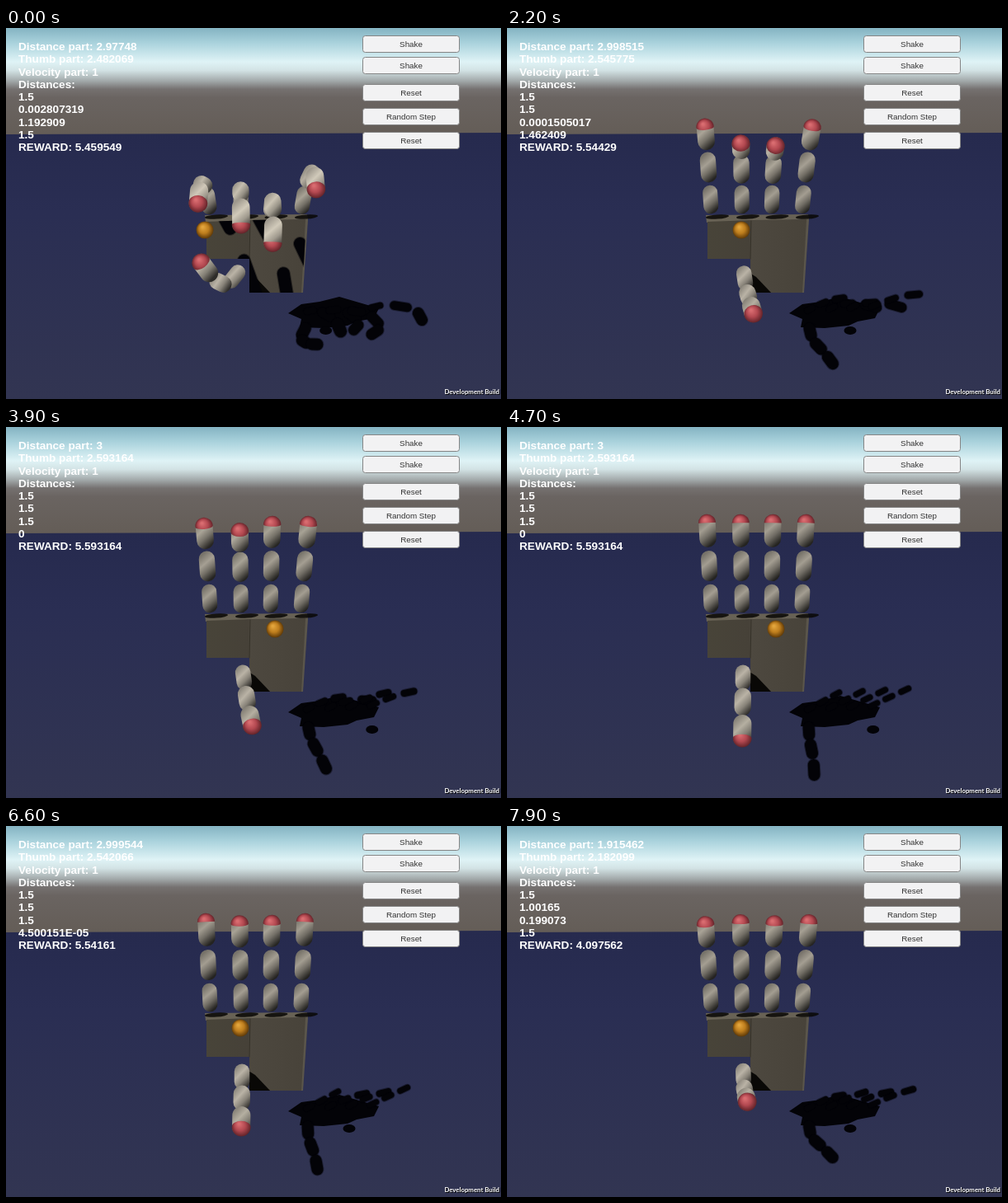
An HTML page with a canvas that plays this animation: 600x450 px, repeating every 8000 ms.

```html
<!DOCTYPE html>
<html lang="en">
<head>
<meta charset="utf-8">
<title>Robot hand training</title>
<style>
  html, body { margin: 0; width: 100%; height: 100%; overflow: hidden; background: #2d3052; }
  #stage { position: relative; width: 600px; height: 450px; overflow: hidden; font-family: "Liberation Sans", Arial, sans-serif; }
  canvas { position: absolute; left: 0; top: 0; }
  #stats { position: absolute; left: 15px; top: 15px; color: #fff; font-weight: 700; font-size: 13.6px; line-height: 15.25px; white-space: pre; }
  .button { position: absolute; left: 432px; width: 118px; height: 21px; box-sizing: border-box; border: 1px solid #858585; border-radius: 3.5px; background: #f2f2f3; color: #323232; font-size: 9.8px; line-height: 19.5px; text-align: center; }
  #build { position: absolute; right: 2px; top: 436px; color: #fff; font: 700 7.8px/10px Lato, sans-serif; text-shadow: 1px 1px 0 #000; }
</style>
</head>
<body>
<div id="stage">
  <canvas id="scene" width="600" height="450"></canvas>
  <div id="stats"></div>
  <div class="button" style="top:9px">Shake</div>
  <div class="button" style="top:35px">Shake</div>
  <div class="button" style="top:68px">Reset</div>
  <div class="button" style="top:97px">Random Step</div>
  <div class="button" style="top:126px">Reset</div>
  <div id="build">Development Build</div>
</div>
<script>
const ctx = document.getElementById('scene').getContext('2d');
const stats = document.getElementById('stats');
const LOOP = 8000, STEP = 100, RAD = Math.PI / 180, HALF = Math.PI / 2;
const BASES = [248, 285, 320.5, 357];
const LENGTHS = [38, 41, 44];
const BALLS = [241, 284, 326];

// Each finger: pitch of its three links and sideways swing, in degrees.
// Last row: the three thumb joints after its root, x and y.
const pose = (...rows) => rows.flat();
const open = pose([0, 0, 0, 0], [0, 0, 0, 0], [0, 0, 0, 0], [0, 0, 0, 0],
  [286, 318, 285.5, 349, 285, 388]);
const waking = pose([0, 0, 0, 0], [0, 4, 14, 0], [0, 3, 12, 0], [0, 0, 0, 0],
  [286, 318, 285.5, 342, 285, 374]);
const easing = pose([0, 3, 18, -2], [0, 2, 8, 0], [0, 3, 14, 2], [0, 2, 8, 4],
  [287, 315, 289, 325, 292, 338]);
const bendMiddle = pose([0, 6, 22, -3], [0, 25, 68, 0], [0, 28, 72, 3], [0, 6, 25, 9],
  [291, 317, 296, 328, 303, 345]);
const bendRing = pose([0, 10, 38, -5], [0, 25, 68, 0], [0, 4, 25, 1], [0, 6, 25, 9],
  [294, 317, 302, 333, 315, 352]);
const gripIndex = pose([15, 75, 126, -9], [20, 95, 167, 0], [43, 112, 174, 3], [10, 50, 130, 12],
  [268, 313, 252, 305, 231, 277]);
const gripRing = pose([0, 28, 78, -7], [50, 115, 190, 0], [20, 92, 166, 4], [15, 62, 110, 14],
  [301, 315, 318, 290, 328, 264]);
const mix = (a, b, k) => a.map((v, i) => v + (b[i] - v) * k);
const gripMiddle = mix(gripIndex, gripRing, 0.5);

// Distance part, thumb part, four distances, reward.
const READOUTS = [
  ['2.97748', '2.482069', '1.5', '0.002807319', '1.192909', '1.5', '5.459549'],
  ['2.99965', '2.606022', '1.5', '4.404783E-05', '1.176216', '1.5', '5.605672'],
  ['2.998515', '2.545775', '1.5', '1.5', '0.0001505017', '1.462409', '5.54429'],
  ['3', '2.593164', '1.5', '1.5', '1.5', '0', '5.593164'],
  ['2.999544', '2.542066', '1.5', '1.5', '1.5', '4.500151E-05', '5.54161'],
  ['1.915462', '2.182099', '1.5', '1.00165', '0.199073', '1.5', '4.097562']
];

const ringKeys = [[0, open], [280, bendRing], [900, gripRing]];
const EPISODES = [
  { start: 0, ball: 0, readout: 0, keys: [[0, gripIndex]] },
  { start: 100, ball: 0, readout: 0, keys: [[0, open], [350, easing], [800, gripIndex]] },
  { start: 900, ball: 1, readout: 1, keys: [[0, open], [400, bendMiddle], [950, gripMiddle]] },
  { start: 1880, ball: 1, readout: 2, keys: [[0, open], [380, bendMiddle], [900, gripMiddle]] },
  { start: 2820, ball: 2, readout: 2, keys: ringKeys },
  { start: 3760, ball: 2, readout: 3, keys: ringKeys },
  { start: 4700, ball: 2, readout: 3, keys: ringKeys },
  { start: 5640, ball: 2, readout: 4, keys: ringKeys },
  { start: 6560, ball: 1, readout: 4, keys: [[0, open], [40, waking], [400, bendMiddle], [900, gripMiddle]] },
  { start: 7500, ball: 1, readout: 5, keys: [[0, open], [400, easing]] }
];

function poseAt(keys, t) {
  const next = keys.findIndex(k => k[0] > t);
  if (next < 0) return keys[keys.length - 1][1];
  const [t0, from] = keys[next - 1], [t1, to] = keys[next];
  return mix(from, to, (t - t0) / (t1 - t0));
}

function fingerJoints(x, [a, b, c, swing]) {
  let y = 227, z = 0;
  const lean = (x - 303) * 0.0009 + Math.sin(swing * 0.4 * RAD);
  const yaw = Math.sin(swing * RAD);
  const joints = [{ x, y, z }];
  [a, b, c].forEach((deg, i) => {
    const up = Math.cos(deg * RAD), out = Math.sin(deg * RAD);
    const len = LENGTHS[i] * (1 + z / 900);
    x += len * (up * lean + out * yaw);
    y += len * (0.17 * out - up);
    z += len * out;
    joints.push({ x, y, z });
  });
  joints.facing = Math.sin(c * RAD);
  joints.bright = [a, b, c].map(v => Math.min(1, v / 130));
  return joints;
}

function thumbJoints(p) {
  const joints = [{ x: 286, y: 290, z: 8 }];
  for (let i = 0; i < 3; i++) joints.push({ x: p[2 * i], y: p[2 * i + 1], z: 28 * (i + 1) });
  const [, , m, e] = joints;
  joints.facing = Math.sqrt(Math.max(0, 1 - (Math.hypot(e.x - m.x, e.y - m.y) / 42) ** 2));
  joints.bright = [0.5, 0.5, 0.4];
  return joints;
}

const between = (a, b, k) => ({ x: a.x + (b.x - a.x) * k, y: a.y + (b.y - a.y) * k });
const link = (joints, i) => [between(joints[i], joints[i + 1], 0.28), between(joints[i], joints[i + 1], 0.72)];

function fillPoly(points, fill) {
  ctx.fillStyle = fill;
  ctx.beginPath();
  points.forEach(p => ctx.lineTo(p[0], p[1]));
  ctx.fill();
}

function line(a, b, width, style) {
  ctx.strokeStyle = style;
  ctx.lineWidth = width;
  ctx.lineCap = 'round';
  ctx.beginPath();
  ctx.moveTo(a.x, a.y);
  ctx.lineTo(b.x, b.y + 0.01);
  ctx.stroke();
}

// A dark stroke with a faint rim.
function softLine(a, b, width) {
  line(a, b, width + 2, 'rgba(3,3,7,.4)');
  line(a, b, width, '#030307');
}

function stops(gradient, list) {
  list.forEach(([at, color]) => gradient.addColorStop(at, color));
  return gradient;
}

function ballShade(x, y, r, light, mid, dark) {
  const g = ctx.createRadialGradient(x - r * 0.25, y - r * 0.35, r * 0.1, x, y, r * 1.05);
  return stops(g, [[0, light], [0.5, mid], [1, dark]]);
}

function capsule(a, b, r, bright) {
  const cx = (a.x + b.x) / 2, cy = (a.y + b.y) / 2, h = Math.abs(b.y - a.y) / 2 + r;
  const tone = v => `rgb(${Math.round(v)},${Math.round(v * 0.965)},${Math.round(v * 0.89)})`;
  const g = ctx.createLinearGradient(cx - r, cy - h * 0.6, cx + r, cy + h * 0.6);
  line(a, b, 2 * r, stops(g, [
    [0, tone(118 + 40 * bright)], [0.36, tone(163 + 46 * bright)],
    [0.66, tone(112 + 48 * bright)], [1, tone(36 + 24 * bright)]
  ]));
}

function redCap(a, b, r, facing) {
  const dir = Math.atan2(b.y - a.y, b.x - a.x);
  ctx.fillStyle = ballShade(b.x, b.y, r, '#d96c70', '#b24850', '#5c2026');
  ctx.beginPath();
  ctx.ellipse(b.x, b.y, r, r, dir, -HALF, HALF);
  if (facing > 0) ctx.ellipse(b.x, b.y, facing * r, r, dir, HALF, 3 * HALF);
  else ctx.ellipse(b.x, b.y, -facing * r, r, dir, HALF, -HALF, true);
  ctx.fill();
}

function drawDigit(joints) {
  for (let i = 0; i < 3; i++) {
    const [a, b] = link(joints, i);
    const r = 9 + 0.6 * i + joints[i + 1].z * 0.01;
    capsule(a, b, r, joints.bright[i]);
    if (i === 2) redCap(a, b, r + 0.4, joints.facing);
  }
}

const skyFill = stops(ctx.createLinearGradient(0, 0, 0, 128), [
  [0, '#84b3c2'], [0.14, '#a9d2dc'], [0.32, '#dff3f6'], [0.4, '#d3e3e5'],
  [0.5, '#a3aaab'], [0.58, '#757170'], [0.66, '#6a6461'], [1, '#645d57']
]);
const floorFill = stops(ctx.createLinearGradient(0, 127, 0, 450),
  [[0, '#262a4e'], [0.3, '#2a2e53'], [1, '#323552']]);
const palmFill = stops(ctx.createLinearGradient(243, 0, 364, 0),
  [[0, '#484439'], [0.42, '#464138'], [0.44, '#4d483f'], [1, '#48433a']]);

function drawWorld() {
  ctx.fillStyle = skyFill;
  ctx.fillRect(0, 0, 600, 130);
  fillPoly([[0, 129], [600, 127], [600, 450], [0, 450]], floorFill);
}

// Where a point of the hand throws its shadow on the floor.
const onFloor = p => ({
  x: 360 + 0.7 * (p.x - 248) + 0.42 * (227 - p.y) + 0.65 * p.z,
  y: 345 - 0.21 * (227 - p.y) - 0.04 * (p.x - 248) + 0.33 * p.z + Math.max(0, p.y - 290) * 0.25
});

function drawFloorShadow(fingers, thumb, ballX) {
  fillPoly([[342, 346], [358, 335], [380, 332], [404, 326], [452, 340], [446, 352],
    [425, 356], [414, 361], [385, 364], [356, 363], [358, 353]], '#030307');
  fingers.forEach(f => {
    const cast = f.map(onFloor);
    for (let i = 0; i < 3; i++) softLine(...link(cast, i), 7 + f[i + 1].z * 0.09);
  });
  const cast = thumb.map(onFloor);
  for (let i = 0; i < 3; i++) softLine(...link(cast, i), 14);
  ctx.fillStyle = '#030307';
  ctx.beginPath();
  ctx.ellipse(416 + (ballX - 284) * 0.66, 367, 7.5, 5, 0, 0, 2 * Math.PI);
  ctx.fill();
}

function drawPalm(fingers) {
  const front = [[243, 235], [296, 233], [364, 232], [359, 321], [295, 321], [295, 280], [243, 280]];
  fillPoly([[241, 227], [365, 226], [366, 232], [296, 235], [242, 236]], '#686255');
  fillPoly(front, palmFill);
  line({ x: 296, y: 234 }, { x: 295, y: 280 }, 1, '#353128');
  fillPoly([[365, 227], [366, 233], [360, 321], [358, 321], [363, 233]], '#5b564b');

  ctx.fillStyle = 'rgba(8,7,5,.85)';
  BASES.forEach(x => {
    ctx.beginPath();
    ctx.ellipse(x + 7, 229, 14, 2.6, -0.07, 0, 2 * Math.PI);
    ctx.fill();
  });

  ctx.save();
  ctx.beginPath();
  front.forEach(p => ctx.lineTo(p[0], p[1]));
  ctx.clip();
  fillPoly([[294, 297], [302, 302], [321, 322], [294, 322]], '#090806');
  const drop = p => ({ x: p.x + 0.9 * p.z, y: p.y + 1.4 * p.z });
  fingers.forEach(f => {
    const cast = f.map(drop);
    for (let i = 1; i < 3; i++) softLine(...link(cast, i), 15);
  });
  ctx.restore();
}

function drawBall(x) {
  ctx.fillStyle = ballShade(x, 245, 10.5, '#e2a43c', '#bd7d1d', '#573406');
  ctx.beginPath();
  ctx.arc(x, 245, 10.5, 0, 2 * Math.PI);
  ctx.fill();
}

function showStats([distance, thumb, d1, d2, d3, d4, reward]) {
  const text = [`Distance part: ${distance}`, `Thumb part: ${thumb}`, 'Velocity part: 1',
    'Distances:', d1, d2, d3, d4, `REWARD: ${reward}`].join('\n');
  if (stats.textContent !== text) stats.textContent = text;
}

function render(t) {
  const episode = EPISODES.filter(e => e.start <= t).pop();
  const p = poseAt(episode.keys, t - episode.start);
  const fingers = BASES.map((x, i) => fingerJoints(x, p.slice(4 * i, 4 * i + 4)));
  const thumb = thumbJoints(p.slice(16));
  const ballX = BALLS[episode.ball];
  drawWorld();
  drawFloorShadow(fingers, thumb, ballX);
  drawPalm(fingers);
  drawBall(ballX);
  fingers.forEach(drawDigit);
  drawDigit(thumb);
  showStats(READOUTS[episode.readout]);
}

// The picture moves in steps, so redraw only when a new step begins.
let shown = -1;
function tick() {
  const t = Math.floor((performance.now() % LOOP) / STEP) * STEP;
  if (t !== shown) render(shown = t);
  requestAnimationFrame(tick);
}
tick();
</script>
</body>
</html>
```
